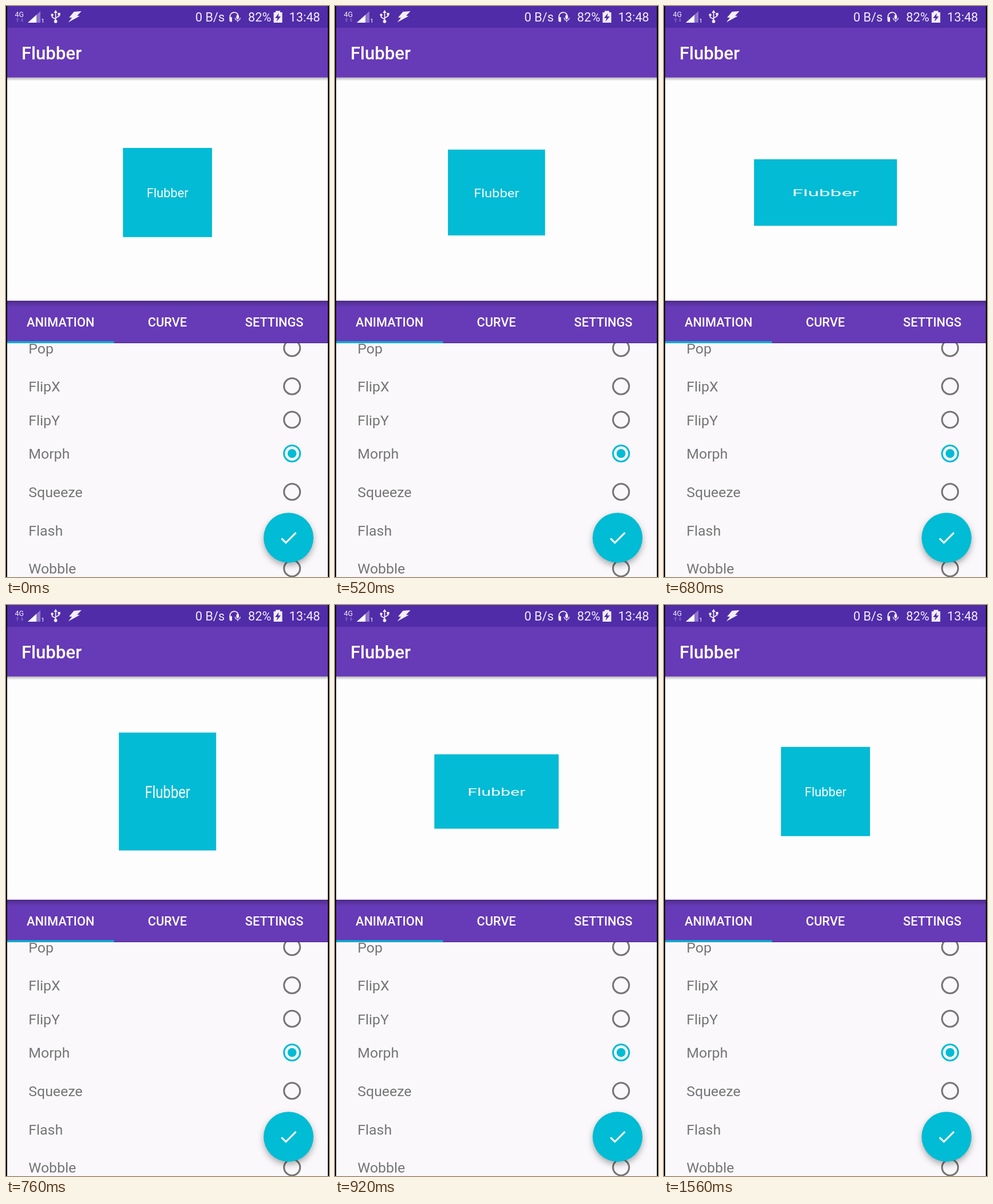
These frames come from a looping animation (563 px wide and 994 px high, 1600 ms). An HTML page with a canvas:

```html
<!DOCTYPE html>
<html lang="en">
<head>
<meta charset="utf-8">
<title>Morph demo</title>
<style>
  html, body { margin: 0; width: 100%; height: 100%; overflow: hidden; background: #000; }
  canvas { display: block; width: 563px; height: 994px; }
</style>
</head>
<body>
<canvas id="stage"></canvas>
<script>
const W = 563, H = 994, LOOP = 1600, STEP = 40;
const DP = 559 / 360;
const PURPLE = '#673ab7', DARK = '#502ca8', CYAN = '#00bcd4', GREY = '#757575', LIGHT = '#f3eefa';
const TAU = Math.PI * 2;

const canvas = document.getElementById('stage');
const ratio = window.devicePixelRatio || 1;
canvas.width = W * ratio;
canvas.height = H * ratio;
const ctx = canvas.getContext('2d');

function rect(x, y, w, h, fill) {
  ctx.fillStyle = fill;
  ctx.fillRect(x, y, w, h);
}

function text(str, x, y, size, fill, weight = 400, align = 'left') {
  ctx.font = `${weight} ${size}px Roboto, sans-serif`;
  ctx.textAlign = align;
  ctx.fillStyle = fill;
  ctx.fillText(str, x, y);
}

function disc(x, y, r, fill) {
  ctx.beginPath();
  ctx.arc(x, y, r, 0, TAU);
  ctx.fillStyle = fill;
  ctx.fill();
}

function shape(d, fill) {
  ctx.fillStyle = fill;
  ctx.fill(new Path2D(d));
}

function line(d, width, color) {
  ctx.lineWidth = width;
  ctx.strokeStyle = color;
  ctx.stroke(new Path2D(d));
}

// Vertical black fade, from alpha a to alpha b.
function fade(y, h, a, b) {
  const g = ctx.createLinearGradient(0, y, 0, y + h);
  g.addColorStop(0, `rgba(0,0,0,${a})`);
  g.addColorStop(1, `rgba(0,0,0,${b})`);
  rect(2, y, 559, h, g);
}

function statusBar() {
  rect(2, 0, 559, 38, DARK);
  text('4G', 15.5, 19, 12.5, LIGHT);
  shape('M17 24l3-3.5 3 3.5h-2v4h-2v-4zM25 24.5h2v-4h2v4h2l-3 3.5z', '#7557bd');
  shape('M38 29L60 9V29z', '#8d75c9');
  shape('M38 29L53 15.4V29z', '#fff');
  text('1', 61.5, 29, 9, LIGHT, 500);

  // USB
  line('M86.5 11V26M86.5 23L80.5 19.5V16M86.5 21L92.5 17.5V14', 1.8, LIGHT);
  shape('M83.2 12L86.5 7L89.8 12z', LIGHT);
  disc(86.5, 26.8, 2.9, LIGHT);
  disc(80.5, 15.5, 2.2, LIGHT);
  rect(90.4, 12, 4.2, 4.2, LIGHT);

  shape('M118.5 10L131.5 9L124 17L128.5 17.5L108.5 28.5L115 20.5L110 20z', LIGHT);

  text('0 B/s', 330, 27, 21.7, LIGHT);

  // Headset with microphone
  line('M390.5 22V18.5A7.2 7.2 0 0 1 404.5 16', 2, LIGHT);
  shape('M389.5 19.5h4.5v8h-2.5q-2 0-2-2.5z', LIGHT);
  ctx.beginPath();
  ctx.roundRect(401.5, 15.5, 4.6, 7.5, 2.3);
  ctx.fillStyle = LIGHT;
  ctx.fill();
  line('M399.4 20.5Q399.6 25 403.8 25Q408 25 408.2 20.5M403.8 25V28', 1.3, LIGHT);

  text('82%', 422, 27, 21.7, LIGHT);
  shape('M470 8.5h8v2.5h3.5v18h-15v-18h3.5z', LIGHT);
  shape('M475.5 12.5L469 21H473.2L471.5 27L479 18.3H474.6z', DARK);
  text('13:48', 493.5, 27, 21.7, LIGHT);
}

function topPanel() {
  rect(2, 124, 559, 389, '#fefdfe');
  rect(2, 38, 559, 86.5, PURPLE);
  fade(124.5, 6, 0.27, 0);
  text('Flubber', 27, 92.5, 20 * DP, '#fff', 500);
}

function list() {
  rect(2, 587, 559, 407, '#faf8fb');
  ctx.save();
  ctx.beginPath();
  ctx.rect(2, 587, 559, 407);
  ctx.clip();
  const rows = [['Pop', 595.5], ['FlipX', 662], ['FlipY', 720.3], ['Morph', 779],
                ['Squeeze', 845.7], ['Flash', 912.3], ['Wobble', 979]];
  for (const [name, y] of rows) {
    const on = name === 'Morph';
    text(name, 39.3, y + 9.3, 16 * DP, GREY);
    ctx.beginPath();
    ctx.arc(498.6, y, 14, 0, TAU);
    ctx.lineWidth = 2 * DP;
    ctx.strokeStyle = on ? CYAN : GREY;
    ctx.stroke();
    if (on) disc(498.6, y, 5 * DP, CYAN);
  }
  ctx.restore();
}

function tabs() {
  rect(2, 513, 559, 73.7, PURPLE);
  fade(513, 11, 0.25, 0);
  ['ANIMATION', 'CURVE', 'SETTINGS'].forEach((name, i) =>
    text(name, 95 + i * 186.3, 558.3, 14 * DP, '#fff', 500, 'center'));
  rect(2, 583.6, 186.3, 3.1, CYAN);
}

function actionButton() {
  ctx.save();
  ctx.shadowColor = 'rgba(0,0,0,0.32)';
  ctx.shadowBlur = 11 * ratio;
  ctx.shadowOffsetY = 5 * ratio;
  disc(492.5, 925.7, 28 * DP, CYAN);
  ctx.restore();
  ctx.save();
  ctx.translate(492.5 - 12 * DP, 925.7 - 12 * DP);
  ctx.scale(DP, DP);
  shape('M9 16.17L4.83 12l-1.42 1.41L9 19 21 7l-1.41-1.41z', '#fff');
  ctx.restore();
}

// Progress through the four morph segments: time, value, speed.
const KNOTS = [[411, 0, 0], [440, 0.009, 0.0006], [600, 0.38, 0.004], [760, 1.613, 0.0115],
               [840, 2.631, 0.0118], [960, 3.77, 0.0075], [1000, 4, 0.003]];

function progress(t) {
  if (t <= KNOTS[0][0]) return 0;
  const i = KNOTS.findIndex(k => k[0] > t);
  if (i < 0) return 4;
  const [t0, p0, v0] = KNOTS[i - 1], [t1, p1, v1] = KNOTS[i];
  const d = t1 - t0, u = (t - t0) / d, w = 1 - u;
  return w * w * ((1 + 2 * u) * p0 + u * d * v0) + u * u * ((3 - 2 * u) * p1 - w * d * v1);
}

const WIDE = 1.714, NARROW = 0.7;
const SCALE_X = [1, WIDE, NARROW, WIDE, 1];
const SCALE_Y = [1, NARROW, WIDE, NARROW, 1];

function along(values, p) {
  const i = Math.min(Math.floor(p), 3);
  return values[i] + (values[i + 1] - values[i]) * (p - i);
}

function morphBox(t) {
  const p = progress(t), side = 100 * DP;
  ctx.save();
  ctx.translate(281.5, 324.7);
  ctx.scale(along(SCALE_X, p), along(SCALE_Y, p));
  rect(-side / 2, -side / 2, side, side, '#03bbd5');
  text('Flubber', 0, 8.2, 14 * DP, '#f4fcfd', 400, 'center');
  ctx.restore();
}

function draw(t) {
  ctx.setTransform(ratio, 0, 0, ratio, 0, 0);
  rect(0, 0, W, H, '#000');
  topPanel();
  statusBar();
  ctx.save();
  ctx.beginPath();
  ctx.rect(2, 124, 559, 389);
  ctx.clip();
  morphBox(t);
  ctx.restore();
  list();
  tabs();
  actionButton();
}

const start = performance.now();
function tick() {
  const t = (performance.now() - start) % LOOP;
  draw(Math.floor(t / STEP) * STEP);
  requestAnimationFrame(tick);
}
tick();
</script>
</body>
</html>
```
